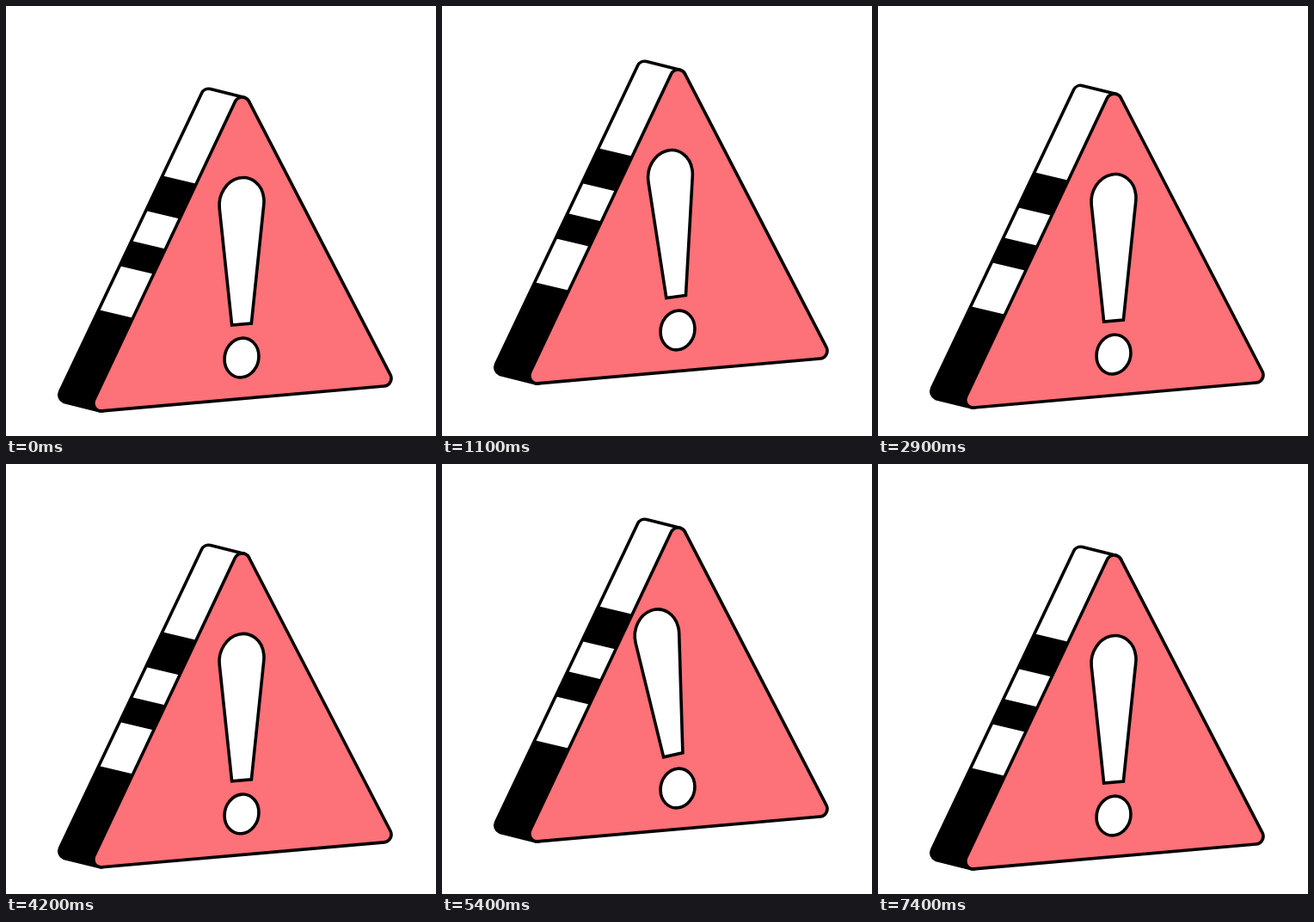
An HTML page with a canvas for the animation above (8000 ms loop, 500 by 500 pixels).

```html
<!DOCTYPE html>
<html lang="en">
<head>
<meta charset="utf-8">
<title>Warning sign</title>
<style>
  html, body { margin: 0; width: 100%; height: 100%; overflow: hidden; background: #fff; }
  canvas { display: block; }
</style>
</head>
<body>
<canvas id="stage" width="500" height="500"></canvas>
<script>
const ctx = document.getElementById('stage').getContext('2d');
const PERIOD = 4000;
const RED = '#fd7178';
const RADIUS = 9;
const APEX = { x: 274.5, y: 115 };
const LEFT = { x: 110.7, y: 461.9 };
const RIGHT = { x: 439, y: 433 };
const BACK_APEX = { x: 235.6, y: 105.3 };
const BACK_LEFT = { x: 70.8, y: 452.1 };
const DEPTH = { x: -39.5, y: -9.4 };
const DOT = { x: 274, y: 409 };

// Keys are [time in ms, value], eased between neighbours.
const LIFT = [[0, 0], [1000, -32], [2167, -32], [3167, 0]];
const LEAN = [[1000, 0], [1267, -10], [1783, 10], [2167, 0]];

// Cubic bezier (0.5, 0, 0.5, 1), inverted by bisection.
function ease(x) {
  let low = 0, high = 1;
  for (let i = 0; i < 24; i++) {
    const mid = (low + high) / 2;
    if (1.5 * mid * (1 - mid) + mid ** 3 < x) low = mid; else high = mid;
  }
  return low * low * (3 - 2 * low);
}

function valueAt(keys, time) {
  if (time <= keys[0][0]) return keys[0][1];
  for (let i = 1; i < keys.length; i++) {
    const [t0, v0] = keys[i - 1], [t1, v1] = keys[i];
    if (time < t1) return v0 + (v1 - v0) * ease((time - t0) / (t1 - t0));
  }
  return keys[keys.length - 1][1];
}

// Outward normal angle of an edge walked counter-clockwise on screen.
const normal = (p, q) => Math.atan2(q.y - p.y, q.x - p.x) + Math.PI / 2;

function roundedHull(points) {
  const n = points.length;
  ctx.beginPath();
  points.forEach((p, i) => {
    const prev = points[(i + n - 1) % n], next = points[(i + 1) % n];
    ctx.arc(p.x, p.y, RADIUS, normal(prev, p), normal(p, next), true);
  });
  ctx.closePath();
}

function paint(fill) {
  ctx.fillStyle = fill;
  ctx.fill();
  ctx.stroke();
}

// Heights are taken on the front edge; the band runs past both edges of the side.
function drawStripe(top, bottom) {
  const corner = (y, depth) => ctx.lineTo(
    102 + 0.4725 * (459 - y) + DEPTH.x * depth, y + DEPTH.y * depth);
  ctx.beginPath();
  corner(top, -0.3);
  corner(top, 1.3);
  corner(bottom, 1.3);
  corner(bottom, -0.3);
  ctx.fillStyle = '#000';
  ctx.fill();
}

function drawSide() {
  roundedHull([APEX, BACK_APEX, BACK_LEFT, LEFT]);
  paint('#fff');
  ctx.save();
  ctx.clip();
  drawStripe(206.7, 247.5);
  drawStripe(282.5, 311.6);
  drawStripe(362.6, 520);
  ctx.restore();
}

// Shapes are laid out in the plane of the front face, around the dot.
function onFace(degrees, trace) {
  ctx.save();
  ctx.translate(DOT.x, DOT.y);
  ctx.rotate(degrees * Math.PI / 180);
  ctx.transform(0.875, -0.077, 0, 1, 0, 0);
  ctx.beginPath();
  trace();
  ctx.closePath();
  ctx.restore();
  paint('#fff');
}

function traceBar() {
  const tilt = 0.118;
  ctx.arc(0, -179.7, 29.7, Math.PI - tilt, tilt);
  ctx.lineTo(13, -39);
  ctx.lineTo(-13, -39);
}

function draw(time) {
  ctx.setTransform(1, 0, 0, 1, 0, 0);
  ctx.fillStyle = '#fff';
  ctx.fillRect(0, 0, 500, 500);
  ctx.translate(0, valueAt(LIFT, time));
  ctx.strokeStyle = '#000';
  ctx.lineWidth = 3.6;
  drawSide();
  roundedHull([APEX, LEFT, RIGHT]);
  paint(RED);
  onFace(valueAt(LEAN, time), traceBar);
  onFace(0, () => ctx.arc(0, 0, 22.8, 0, Math.PI * 2));
}

const start = performance.now();
function tick() {
  draw((performance.now() - start) % PERIOD);
  requestAnimationFrame(tick);
}
tick();
</script>
</body>
</html>
```
